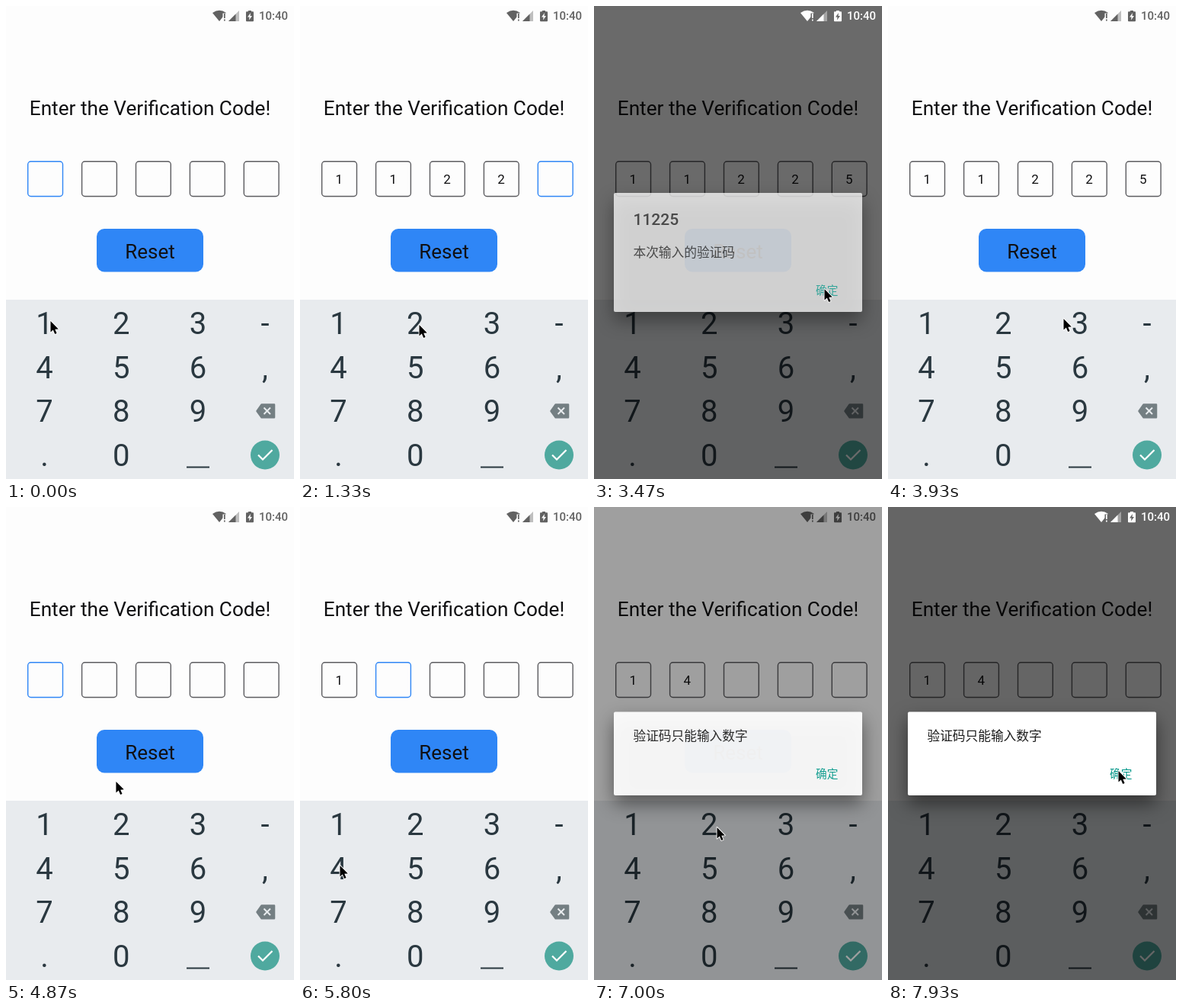
An HTML page with a canvas that plays this animation: 378x620 px, repeating every 8 s.

```html
<!DOCTYPE html>
<html lang="zh-Hans">
<head>
<meta charset="utf-8">
<title>Verification code</title>
<style>
html, body { margin: 0; width: 100%; height: 100%; overflow: hidden; background: #fdfdfd; }
canvas { display: block; width: 378px; height: 620px; }
</style>
</head>
<body>
<canvas id="stage" width="378" height="620"></canvas>
<script>
const ctx = document.getElementById('stage').getContext('2d');
const LOOP = 8000;
const REST = 150;
const TRAVEL = 900;
const LATIN = 'Roboto, sans-serif';
const CJK = '"Noto Sans CJK SC", "Noto Sans CJK", sans-serif';

const PAGE = '#fdfdfd';
const PAD = '#e8ebee';
const KEY = '#2a3840';
const INK = '#101012';
const STATUS = '#626262';
const BLUE = '#2f86f6';

// The pointer visits these in turn; a tap may type a digit or reset the boxes.
const STEPS = [
  { at: 250, x: 58, y: 413, types: '1' },
  { at: 520, x: 58, y: 413, types: '1' },
  { at: 1050, x: 156, y: 418, types: '2' },
  { at: 1320, x: 156, y: 418, types: '2' },
  { at: 1850, x: 156, y: 468, types: '5' },
  { at: 3380, x: 302, y: 371 },
  { at: 3930, x: 230, y: 410 },
  { at: 4550, x: 200, y: 325, resets: true },
  { at: 5250, x: 57, y: 414, types: '1' },
  { at: 5950, x: 52, y: 470, types: '4' },
  { at: 6850, x: 161, y: 420 },
  { at: 7650, x: 302, y: 346 }
];

const DIALOGS = [
  { open: 1920, close: 3440, top: 245, height: 156, title: '11225', text: '本次输入的验证码' },
  { open: 6870, close: Infinity, top: 268.5, height: 109.5, text: '验证码只能输入数字' }
];

const clamp = v => Math.max(0, Math.min(1, v));
const ease = v => v * v * (3 - 2 * v);

function label(text, x, y, size, color, align = 'center', weight = 400, family = LATIN) {
  ctx.font = `${weight} ${size}px ${family}`;
  ctx.textAlign = align;
  ctx.fillStyle = color;
  ctx.fillText(text, x, y);
}

function path(points) {
  ctx.beginPath();
  points.forEach(([x, y]) => ctx.lineTo(x, y));
}

function fillShape(points, color) {
  path(points);
  ctx.fillStyle = color;
  ctx.fill();
}

function line(points, color, width) {
  path(points);
  ctx.strokeStyle = color;
  ctx.lineWidth = width;
  ctx.stroke();
}

function round(x, y, w, h, r) {
  ctx.beginPath();
  ctx.roundRect(x, y, w, h, r);
}

function digitsAt(t) {
  let digits = '';
  for (const step of STEPS) {
    if (step.at > t) break;
    digits = step.resets ? '' : digits + (step.types || '');
  }
  return digits;
}

function dialogAt(t) {
  const box = DIALOGS.find(d => t >= d.open && t < d.close + 300);
  if (!box) return { dim: 0, alpha: 0 };
  return {
    box,
    dim: clamp((t - box.open) / 210) * (1 - ease(clamp((t - box.close) / 300))),
    alpha: clamp((t - box.open) / 140) * (1 - clamp((t - box.close) / 125)),
    white: t > box.open + 240 && t < box.close + 160
  };
}

function drawStatus(color, page) {
  ctx.fillStyle = color;
  ctx.beginPath();
  ctx.moveTo(271, 9);
  ctx.quadraticCurveTo(280, 2.5, 289, 9);
  ctx.lineTo(280, 20);
  ctx.fill();
  ctx.fillStyle = page;
  ctx.fillRect(284.5, 9.5, 5, 11);
  ctx.fillStyle = color;
  ctx.fillRect(286, 10, 1.7, 6);
  ctx.fillRect(286, 17.5, 1.7, 2);

  ctx.globalAlpha = 0.4;
  fillShape([[306, 6], [306, 20], [292, 20]], color);
  ctx.globalAlpha = 1;
  fillShape([[301.5, 10.5], [301.5, 20], [292, 20]], color);

  ctx.fillRect(318, 6, 4, 2);
  round(315, 7.3, 10, 13, 1);
  ctx.fill();
  fillShape([[321, 9], [317, 14.5], [319.5, 14.5], [319, 18.5], [323, 13], [320.5, 13]], page);

  label('10:40', 370, 18.3, 15, color, 'right', 500);
}

function drawForm(digits, busy) {
  label('Enter the Verification Code!', 189, 143, 26.2, INK);
  for (let i = 0; i < 5; i++) {
    const x = 28 + i * 70.9;
    round(x + 0.7, 203.7, 45.8, 45.8, 4);
    ctx.strokeStyle = !busy && i === digits.length ? BLUE : '#5c5c60';
    ctx.lineWidth = 1.4;
    ctx.stroke();
    if (digits[i]) label(digits[i], x + 23.3, 233, 17, INK);
  }
  round(119, 292, 140, 56.5, 10);
  ctx.fillStyle = BLUE;
  ctx.fill();
  label('Reset', 189, 331, 26, INK);
}

function drawKeypad() {
  ctx.fillStyle = PAD;
  ctx.fillRect(0, 385, 378, 235);
  ['123-', '456,', '789', '.0'].forEach((row, r) => {
    [...row].forEach((key, i) => {
      label(key, i < 3 ? 50.5 + i * 100.7 : 340, 430 + r * 57.6, 40, KEY);
    });
  });
  ctx.fillStyle = KEY;
  ctx.fillRect(237, 603.5, 30, 2);

  ctx.lineJoin = 'round';
  path([[329.5, 531], [335.5, 522.5], [352, 522.5], [352, 539.2], [335.5, 539.2]]);
  ctx.closePath();
  ctx.fillStyle = ctx.strokeStyle = '#747f83';
  ctx.lineWidth = 2.5;
  ctx.fill();
  ctx.stroke();
  line([[338.5, 526.5], [347, 535]], PAD, 2);
  line([[347, 526.5], [338.5, 535]], PAD, 2);

  ctx.beginPath();
  ctx.arc(340, 588.5, 19, 0, Math.PI * 2);
  ctx.fillStyle = '#4fa99f';
  ctx.fill();
  ctx.lineJoin = 'miter';
  line([[331, 588.5], [337, 594.5], [349.5, 582]], '#fff', 2.2);
}

function drawDialog({ box, alpha }) {
  const bottom = box.top + box.height;
  ctx.save();
  ctx.globalAlpha = alpha;
  ctx.shadowColor = 'rgba(0, 0, 0, 0.5)';
  ctx.shadowBlur = 24;
  ctx.shadowOffsetY = 11;
  round(26, box.top, 326, box.height, 2);
  ctx.fillStyle = '#fff';
  ctx.fill();
  ctx.shadowColor = 'transparent';
  if (box.title) label(box.title, 51.5, box.top + 41.5, 21, '#1c1c1c', 'left', 500);
  label(box.text, 51.5, bottom - 72.5, 16.7, '#1c1c1c', 'left', 400, CJK);
  label('确定', 320.5, bottom - 23.5, 14.7, '#009688', 'right', 400, CJK);
  ctx.restore();
}

// Each trip ends a short rest before its tap and never starts until the last tap is over.
function pointerAt(t) {
  const i = STEPS.findIndex(step => step.at > t);
  const to = STEPS[i] || STEPS[STEPS.length - 1];
  const from = STEPS[i - 1] || to;
  const end = to.at - REST;
  const begin = Math.max(from.at + REST, end - TRAVEL);
  const k = end > begin ? ease(clamp((t - begin) / (end - begin))) : 1;
  return [from.x + (to.x - from.x) * k, from.y + (to.y - from.y) * k];
}

function drawPointer(t) {
  ctx.save();
  ctx.translate(...pointerAt(t));
  path([[0.5, 0], [0.5, 14.5], [3.8, 11.6], [6.2, 17], [8.6, 16], [6.3, 10.8], [10.8, 10.4]]);
  ctx.closePath();
  ctx.lineJoin = 'round';
  ctx.strokeStyle = '#fff';
  ctx.lineWidth = 1.8;
  ctx.stroke();
  ctx.fillStyle = '#000';
  ctx.fill();
  ctx.restore();
}

function draw(t) {
  const dialog = dialogAt(t);
  ctx.fillStyle = PAGE;
  ctx.fillRect(0, 0, 378, 620);
  if (!dialog.white) drawStatus(STATUS, PAGE);
  drawForm(digitsAt(t), dialog.box);
  drawKeypad();
  ctx.fillStyle = `rgba(0, 0, 0, ${0.6 * dialog.dim})`;
  ctx.fillRect(0, 0, 378, 620);
  if (dialog.white) drawStatus('#fff', '#656565');
  if (dialog.alpha > 0) drawDialog(dialog);
  drawPointer(t);
}

const start = performance.now();
function tick() {
  draw((performance.now() - start) % LOOP);
  requestAnimationFrame(tick);
}
tick();
</script>
</body>
</html>
```
